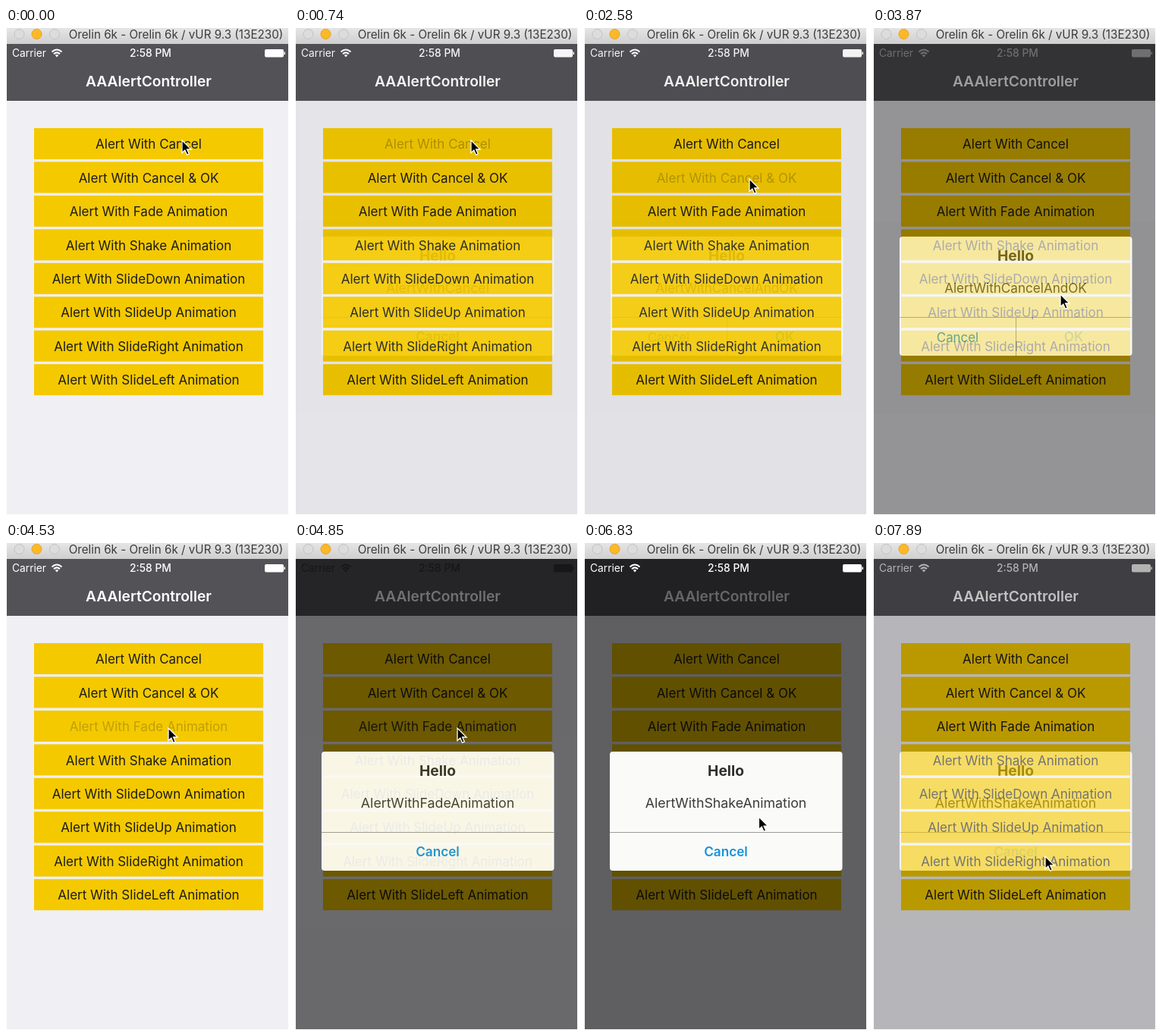
Animation of 373x642 px, one loop 8000 ms. Source, as an HTML page:

```html
<!DOCTYPE html>
<html lang="en">
<head>
<meta charset="utf-8">
<title>AAAlertController demo</title>
<style>
  html, body { margin: 0; width: 100%; height: 100%; overflow: hidden; background: #fff; }
  svg { display: block; width: 373px; height: 642px; font-family: Inter, Roboto, sans-serif; }
</style>
</head>
<body>
<svg id="stage" viewBox="0 0 373 642"></svg>
<script>
const LOOP = 8000, FADE = 300, MID = 188;

const names = ['Cancel', 'Cancel & OK', 'Fade Animation', 'Shake Animation', 'SlideDown Animation',
  'SlideUp Animation', 'SlideRight Animation', 'SlideLeft Animation'];

// tap: button touched; show / hide: fades begin; close: alert action touched
const alerts = [
  { text: 'AlertWithCancel', tap: 570, show: 690, close: 1590, hide: 1710 },
  { text: 'AlertWithCancelAndOK', size: 17.1, ok: true, tap: 2430, show: 2523, close: 3730, hide: 3750 },
  { text: 'AlertWithFadeAnimation', tap: 4530, show: 4600, close: 5540, hide: 5613 },
  { text: 'AlertWithShakeAnimation', shake: true, tap: 6210, show: 6290, close: 7710, hide: 7720 }
];

// Pointer path: time, x, y
const path = [
  [0, 232, 148], [850, 232, 148], [1320, 240, 401], [1590, 240, 401], [1650, 237, 378], [1710, 237, 378],
  [2170, 218, 199], [2780, 218, 199], [3310, 265, 402], [3740, 265, 402], [3870, 247, 351], [3960, 247, 351],
  [4380, 214, 244], [4930, 214, 244], [5270, 237, 396], [5360, 237, 396], [5500, 239, 402], [5900, 239, 402],
  [6090, 224, 285], [6560, 224, 285], [6940, 232, 380], [7060, 232, 380], [7250, 225, 450], [7410, 227, 413],
  [LOOP, 227, 413]
];

const text = (s, x, y, size, weight = 400, attrs = '') =>
  `<text x="${x}" y="${y + size * .364}" font-size="${size}" font-weight="${weight}" text-anchor="middle" ${attrs}>${s.replace('&', '&amp;')}</text>`;

const rect = (x, y, w, h, fill, attrs = '') =>
  `<rect x="${x}" y="${y}" width="${w}" height="${h}" fill="${fill}" ${attrs}/>`;

const light = (x, fill, edge) => `<circle cx="${x}" cy="8" r="6.5" fill="${fill}" stroke="${edge}"/>`;

const buttons = names.map((name, i) => {
  const y = 132 + i * 44.45;
  return rect(37, y, 302, 41, '#f4c900') + text('Alert With ' + name, MID, y + 21, 17, 400, 'class="label" fill="#1c1c1c"');
}).join('');

const status = `<g id="status">
  ${text('Carrier', 30.5, 33, 13.8)}
  <g fill="none" stroke-width="2"><path d="M60.5 31.5Q67 25.500 73.500 31.500M63 34.300Q67 30.500 71 34.300"/></g>
  <path d="M64.800 36Q67 34 69.200 36L67 38.500Z"/>
  ${text('2:58 PM', 190.500, 33, 13.8, 500)}
  <rect x="341" y="28" width="25" height="10.500" rx="2"/><rect x="366.500" y="31.500" width="1.500" height="3.500"/>
</g>`;

const alertBox = a => `<g class="alert">
  ${rect(35, 275, 306.5, 157, '#fafaf8', 'rx="4"')}
  ${text('Hello', MID, 300.5, 19.2, 700, 'fill="#2f2f2f"')}
  ${text(a.text, MID, 343, a.size || 17.8, 400, 'fill="#3a3a3a"')}
  ${rect(35, 381, 306.5, 1, '#9a9a9a')}
  ${a.ok ? rect(188, 382, 1, 50, '#9a9a9a') + text('Cancel', 111.5, 407.5, 16.9, 400, 'fill="#1592dc"') : ''}
  ${text(a.ok ? 'OK' : 'Cancel', a.ok ? 264.5 : MID, 407, 17.2, 600, 'class="action" fill="#1592dc"')}
</g>`;

stage.innerHTML = `
  <linearGradient id="bar" x2="0" y2="1"><stop stop-color="#e6e5e6"/><stop offset="1" stop-color="#d0cfd0"/></linearGradient>
  ${rect(1, 0, 371, 21, 'url(#bar)')}
  ${light(17.5, '#dcdcdc', '#c3c3c3')}${light(40.5, '#fdb827', '#e5a31f')}${light(64, '#dcdcdc', '#c3c3c3')}
  ${text('Orelin 6k - Orelin 6k / vUR 9.3 (13E230)', 224, 8.500, 15.2, 400, 'fill="#3c3c3c"')}
  ${rect(1, 21, 371, 620, '#efeff4')}
  ${rect(1, 21, 371, 75, '#535257')}
  ${text('AAAlertController', MID, 70, 19.2, 600, 'fill="#fff"')}
  ${buttons}
  <g id="overlay">${rect(1, 21, 371, 620, '#000', 'fill-opacity=".6"')}${alerts.map(alertBox).join('')}</g>
  ${status}
  <path id="pointer" d="M0 0V16.500L3.800 13L6.500 19.200L9.300 18L6.600 12H12Z" stroke="#fff" stroke-width="1.300"/>`;

const pick = cls => [...stage.querySelectorAll('.' + cls)];
const labels = pick('label'), boxes = pick('alert'), actions = pick('action');
const set = (el, key, value) => el.setAttribute(key, value);
const clamp = v => Math.min(1, Math.max(0, v));
const ease = v => (v = clamp(v), v * v * (3 - 2 * v));

// Touched text turns pale at once, then returns after release
const pressed = (t, start, hold) => t < start ? 1 : .24 + .76 * ease((t - start - hold) / 250);

function pointerAt(t) {
  const i = path.findIndex(p => p[0] > t);
  const [t0, x0, y0] = path[i - 1], [t1, x1, y1] = path[i];
  const k = ease((t - t0) / (t1 - t0));
  return `translate(${x0 + (x1 - x0) * k} ${y0 + (y1 - y0) * k})`;
}

function shakeAt(t) {
  const k = clamp(t / 600);
  return 16 * (1 - k) * Math.sin(k * Math.PI * 8);
}

function draw(t) {
  let shown = 0, dark = 0;
  alerts.forEach((a, i) => {
    const out = ease((t - a.hide) / FADE);
    const level = ease((t - a.show) / FADE) * (1 - out);
    const active = level > 0;
    set(boxes[i], 'visibility', active ? 'visible' : 'hidden');
    set(labels[i], 'opacity', pressed(t, a.tap, 130));
    set(actions[i], 'opacity', pressed(t, a.close, 320));
    if (!active) return;
    shown = level;
    dark = a.shake ? ease((t - 7060) / 350) * (1 - out) : level;
    if (a.shake) set(boxes[i], 'transform', `translate(${shakeAt(t - a.show)} 0)`);
  });
  set(overlay, 'opacity', shown);
  const grey = Math.round(255 * (1 - dark ** 1.3));
  const ink = `rgb(${grey},${grey},${grey})`;
  set(document.getElementById('status'), 'fill', ink);
  set(document.getElementById('status'), 'stroke', 'none');
  set(document.querySelector('#status g'), 'stroke', ink);
  set(pointer, 'transform', pointerAt(t));
}

const began = performance.now();
function tick() {
  draw((performance.now() - began) % LOOP);
  requestAnimationFrame(tick);
}
tick();
</script>
</body>
</html>
```
